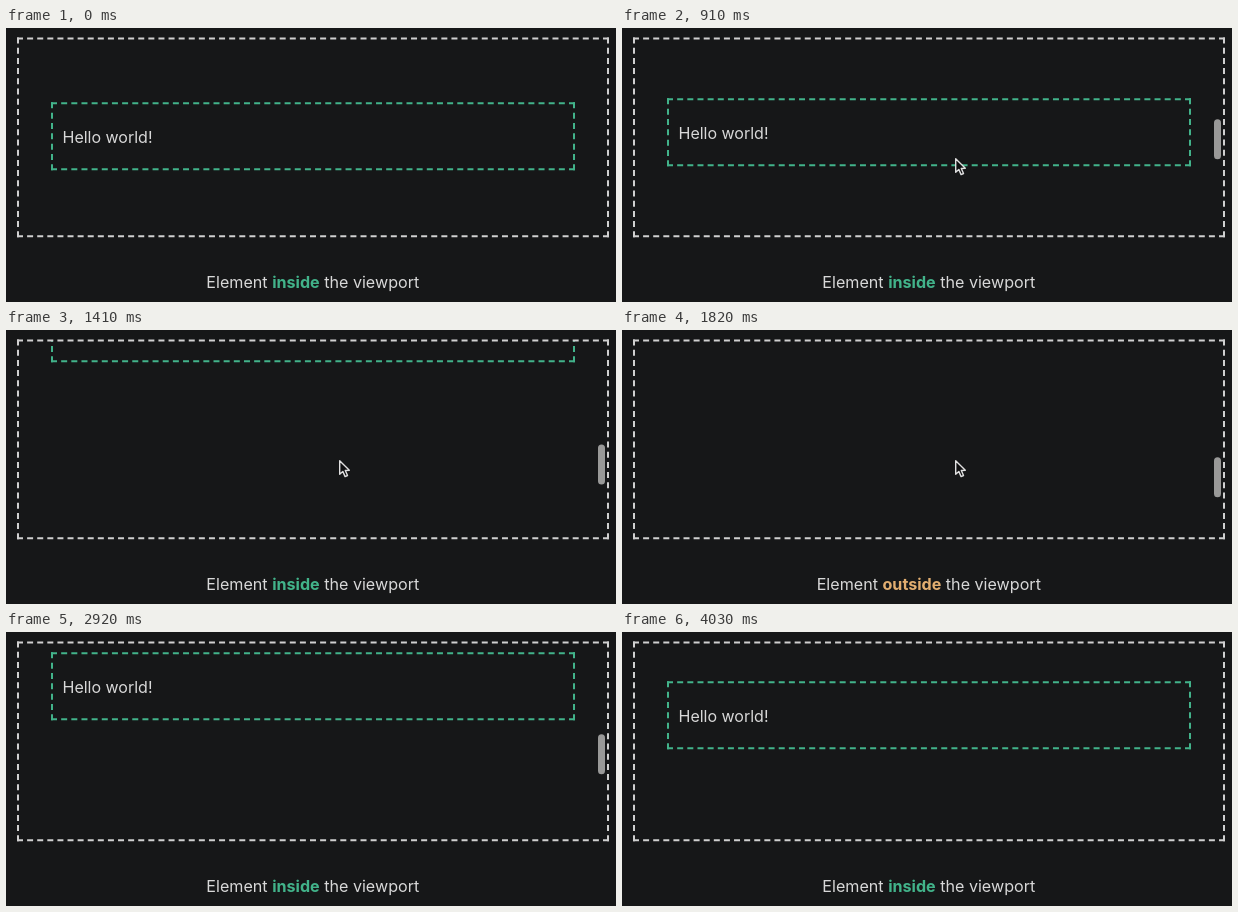
An HTML page with a canvas that plays this animation: 610 by 274 pixels, repeating every 4.23 s.

```html
<!DOCTYPE html>
<html lang="en">
<head>
<meta charset="utf-8">
<title>Element visibility</title>
<style>
  html, body { margin: 0; width: 100%; height: 100%; overflow: hidden; background: #161718; }
  canvas { display: block; width: 610px; height: 274px; }
</style>
</head>
<body>
<canvas id="stage"></canvas>
<script>
const W = 610, H = 274, LOOP = 4230, TICK = LOOP / 42;
const GREEN = '#42b38a', ORANGE = '#e2ae70', TEXT = '#d8d8d8', BG = '#161718';
const FONT = 'Inter, "Liberation Sans", sans-serif';

const canvas = document.getElementById('stage');
const ctx = canvas.getContext('2d');
const ratio = window.devicePixelRatio || 1;
canvas.width = W * ratio;
canvas.height = H * ratio;

// Keys are [tick, value] pairs.
const SCROLL = [[8, 0], [9, 4], [10, 22], [12, 67], [14, 110], [16, 148], [17, 161], [18, 168],
  [22, 168], [23, 160], [25, 122], [27, 82], [29, 54], [30, 42], [31, 32], [32, 25]];
const THUMB_ALPHA = [[8, 0], [9, 1], [34, 1], [40, 0]];
const POINTER_ALPHA = [[1, 0], [4, 1], [22, 1], [25, 0]];

function sample(keys, t) {
  if (t <= keys[0][0]) return keys[0][1];
  for (let i = 1; i < keys.length; i++) {
    const [t0, a] = keys[i - 1], [t1, b] = keys[i];
    if (t <= t1) return a + (b - a) * (t - t0) / (t1 - t0);
  }
  return keys[keys.length - 1][1];
}

function dashedLine(x1, y1, x2, y2) {
  const dash = 6, gap = 4;
  const len = Math.hypot(x2 - x1, y2 - y1);
  const n = Math.floor((len + gap) / (dash + gap));
  ctx.setLineDash([dash, (len - n * dash) / (n - 1)]);
  ctx.beginPath();
  ctx.moveTo(x1, y1);
  ctx.lineTo(x2, y2);
  ctx.stroke();
}

function dashedBox(x, y, w, h, color) {
  const r = x + w, b = y + h;
  ctx.strokeStyle = color;
  ctx.lineWidth = 2;
  dashedLine(x, y + 1, r, y + 1);
  dashedLine(x, b - 1, r, b - 1);
  dashedLine(x + 1, y, x + 1, b);
  dashedLine(r - 1, y, r - 1, b);
  ctx.setLineDash([]);
}

function drawElement(scroll) {
  ctx.save();
  ctx.beginPath();
  ctx.rect(13, 11, 588, 197);
  ctx.clip();
  dashedBox(45, 74.3 - scroll, 524, 68, GREEN);
  ctx.font = '400 16px ' + FONT;
  ctx.fillStyle = TEXT;
  ctx.fillText('Hello world!', 56.5, 114.9 - scroll);
  ctx.restore();
}

function drawThumb(scroll, alpha) {
  ctx.globalAlpha = alpha;
  ctx.fillStyle = '#999998';
  ctx.beginPath();
  ctx.roundRect(592, 90.3 + scroll / 4.54, 7, 40, 3.5);
  ctx.fill();
  ctx.globalAlpha = 1;
}

function drawPointer(alpha) {
  ctx.save();
  ctx.globalAlpha = alpha;
  ctx.translate(333.7, 130.8);
  ctx.beginPath();
  ctx.moveTo(0, 0);
  ctx.lineTo(0, 13.4);
  ctx.lineTo(3.1, 10.6);
  ctx.lineTo(5.4, 15.8);
  ctx.lineTo(7.8, 14.7);
  ctx.lineTo(5.6, 9.7);
  ctx.lineTo(9.6, 9.5);
  ctx.closePath();
  ctx.fillStyle = '#101011';
  ctx.fill();
  ctx.lineJoin = 'round';
  ctx.lineWidth = 1.4;
  ctx.strokeStyle = '#e0e0e0';
  ctx.stroke();
  ctx.restore();
}

function drawCaption(inside) {
  const parts = [
    ['Element ', 400, TEXT],
    [inside ? 'inside' : 'outside', 700, inside ? GREEN : ORANGE],
    [' the viewport', 400, TEXT]
  ];
  const setFont = weight => { ctx.font = weight + ' 16.12px ' + FONT; };
  const widths = parts.map(([text, weight]) => {
    setFont(weight);
    return ctx.measureText(text).width;
  });
  let x = 306.8 - widths.reduce((a, b) => a + b) / 2;
  parts.forEach(([text, weight, color], i) => {
    setFont(weight);
    ctx.fillStyle = color;
    ctx.fillText(text, x, 259.6);
    x += widths[i];
  });
}

function draw(tick) {
  const scroll = sample(SCROLL, tick);
  ctx.setTransform(ratio, 0, 0, ratio, 0, 0);
  ctx.fillStyle = BG;
  ctx.fillRect(0, 0, W, H);

  drawElement(scroll);
  drawThumb(scroll, sample(THUMB_ALPHA, tick));
  dashedBox(11, 9.5, 592, 199.8, '#d0d0d0');
  drawPointer(sample(POINTER_ALPHA, tick));
  drawCaption(tick < 16 || tick > 25);
}

const start = performance.now();

function frame() {
  const t = (performance.now() - start) % LOOP;
  draw(Math.floor(t / TICK + 0.05) % 42);
  requestAnimationFrame(frame);
}
frame();
</script>
</body>
</html>
```
